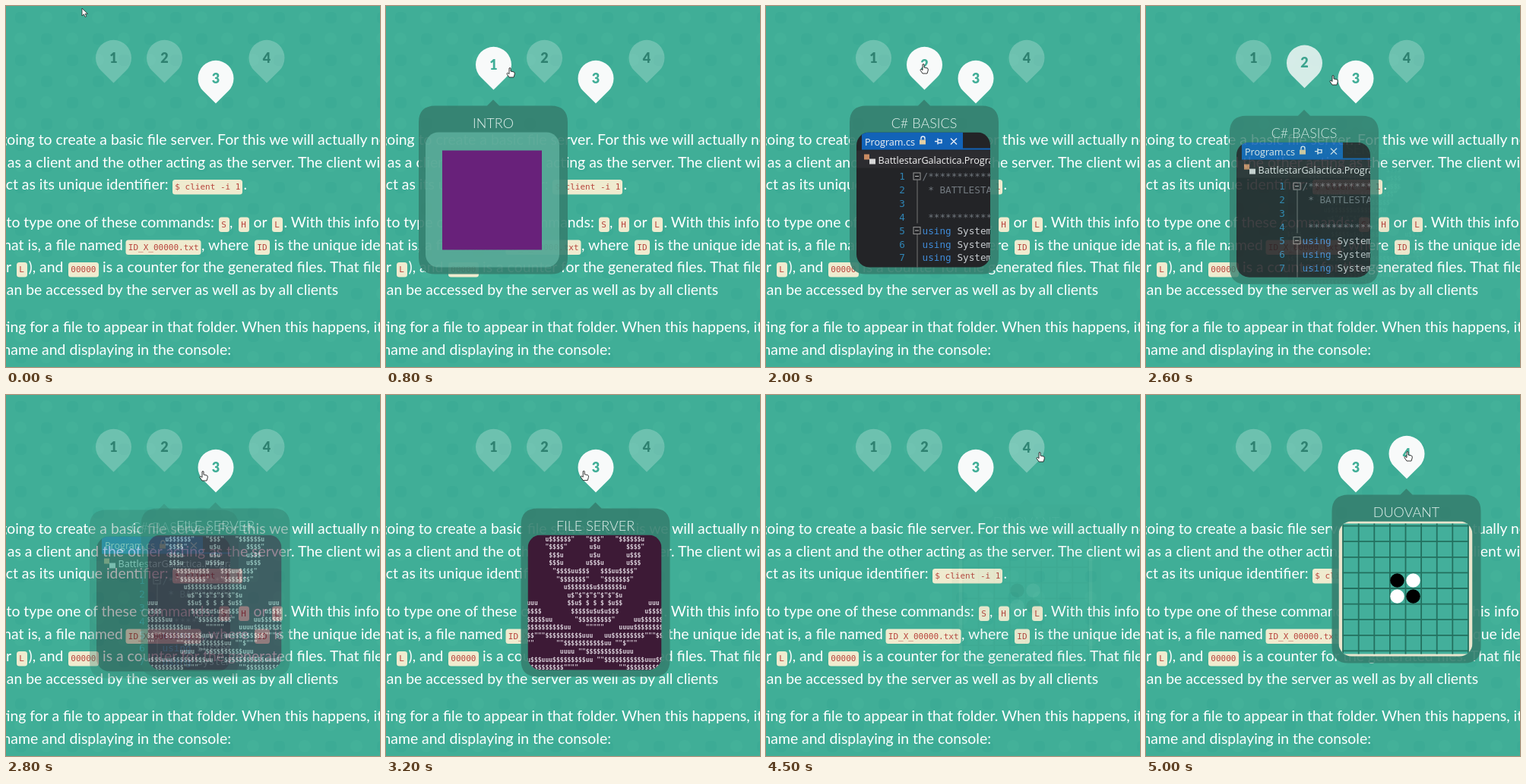
Animation of 492x476 px, one loop 5100 ms. Source, as an HTML page:

```html
<!DOCTYPE html>
<html lang="en">
<head>
<meta charset="utf-8">
<title>Lesson steps</title>
<style>
html, body { margin: 0; width: 100%; height: 100%; overflow: hidden; background: #40ae97; }
svg { display: block; width: 492px; height: 476px; }
text { white-space: pre; }
.body { font: 19.4px Lato, sans-serif; fill: #fff; }
.chip { font: 11px "DejaVu Sans Mono", monospace; fill: #b8443c; }
.num { font: 900 18px Lato, sans-serif; text-anchor: middle; }
.title { font: 300 18px Lato, sans-serif; text-anchor: middle; fill: #e3f1ed; }
.ui { font: 12.6px "Open Sans", sans-serif; fill: #f2f2f2; }
.code { font: 12.7px "DejaVu Sans Mono", monospace; fill: #737a80; }
.skull { font: bold 8.05px "DejaVu Sans Mono", monospace; fill: #d6ccd6; }
</style>
</head>
<body>
<svg viewBox="0 0 492 476">
  <defs>
    <pattern id="spots" width="68" height="56" patternUnits="userSpaceOnUse">
      <g fill="#1d8f7c" opacity=".1">
        <rect x="12" y="8" width="15" height="15" rx="5"/>
        <rect x="46" y="36" width="15" height="15" rx="5"/>
      </g>
      <g fill="#6fd0b4" opacity=".07">
        <circle cx="53" cy="15" r="8"/>
        <circle cx="19" cy="43" r="8"/>
      </g>
    </pattern>
    <clipPath id="thumb"><rect x="-89" y="166" width="176" height="178" rx="17"/></clipPath>
  </defs>
  <rect width="492" height="476" fill="#40ae97"/>
  <rect width="492" height="476" fill="url(#spots)"/>
  <g id="page"></g>
  <g id="tips"></g>
  <g id="pins"></g>
  <g id="cursor">
    <path id="arrow" d="M0 0V10L2.4 7.8L4 11.4L5.8 10.6L4.2 7.2H7.4Z" fill="#fff" stroke="#222" stroke-width=".8"/>
    <path id="hand" d="M-1 0Q0-1 1 0V4L5.4 5Q6.6 5.6 6.2 8L5 12H-1L-4 7.6Q-4 6-2.6 6.4L-1 7.6Z" fill="#fff" stroke="#222" stroke-width=".9"/>
    <path id="beam" d="M-2.5-4H2.5M0-4V4M-2.5 4H2.5" fill="none" stroke="#4b6f66" stroke-width=".7"/>
  </g>
</svg>
<script>
const $ = id => document.getElementById(id);
const esc = s => s.replace(/&/g, '&amp;').replace(/</g, '&lt;');
const text = (x, y, cls, s, more = '') => `<text x="${x}" y="${y}" class="${cls}" ${more}>${esc(s)}</text>`;
const rect = (x, y, w, h, fill, more = '') =>
  `<rect x="${x}" y="${y}" width="${w}" height="${h}" fill="${fill}" ${more}/>`;
const range = n => [...Array(n).keys()];

// Each line: baseline, then [x, text] runs; a third item makes a chip of that width.
const lines = [
  [183, [-8.8, 'going to create a basic file server. For this we will actually need']],
  [212.5, [1.8, 'as a client and the other acting as the server. The client will']],
  [242, [-10, 'act as its unique identifier:'], [219, '$ client -i 1', 92], [312.5, '.']],
  [291.5, [0.5, 'to type one of these commands:'], [280, 'S', 14], [294, ','], [306, 'H', 14],
    [325.5, 'or'], [350, 'L', 14], [365.5, '. With this information']],
  [321.5, [-15, 'That is, a file named'], [157.5, 'ID_X_00000.txt', 99], [257, ', where'],
    [327, 'ID', 20], [352.5, 'is the unique identifier']],
  [351, [-11, 'or'], [14, 'L', 14], [29.5, '), and'], [82, '00000', 40],
    [127, 'is a counter for the generated files. That file']],
  [380.5, [-8.5, 'can be accessed by the server as well as by all clients']],
  [430, [-6.5, 'ting for a file to appear in that folder. When this happens, it']],
  [459.5, [-4.5, 'name and displaying in the console:']]
];
$('page').innerHTML = lines.map(([y, ...runs]) => runs.map(([x, s, w]) => w
  ? rect(x, y - 13, w, 19.5, '#efebcf', 'rx="3.5"') + text(x + 3.3, y, 'chip', s)
  : text(x, y, 'body', s)).join('')).join('');

const block = rect(-67, 190, 131, 131, '#68217a');

const editor = () => {
  let s = rect(-89, 166, 176, 180, '#232427') + rect(-89, 190, 176, 23, '#2c2c30') +
    rect(-82, 166, 133, 22, '#1263b8') + rect(-82, 187, 170, 2, '#1263b8') +
    text(-78, 183, 'ui', 'Program.cs') + text(-60.5, 207, 'ui', 'BattlestarGalactica.Program') +
    '<path d="M-4 176V174A2 2 0 0 1 1 174V176M14 178H18M18 174V182M18 176H23V180H18M35 174L43 182M43 174L35 182" fill="none" stroke="#e8eef6" stroke-width="1.4"/>' +
    rect(-6, 176, 8, 6, '#e3cfa4') + rect(-79, 195, 7, 7, '#c98b62') + rect(-72, 201, 8, 7, '#d8d8d8') +
    '<path d="M-9 229V286M-9 300V346" stroke="#777" fill="none"/>';
  const code = ['/**************', ' * BATTLESTAR', '', ' **************', '', '', ''];
  code.forEach((c, i) => {
    const y = 228.5 + 17.9 * i;
    s += text(-25, y, 'code', String(i + 1), 'text-anchor="end" style="fill:#2f84b4"') + text(-2.5, y, 'code', c);
    if (i > 3) s += text(-2.5, y, 'code', 'using', 'style="fill:#3f8ad6"') +
      text(43.4, y, 'code', 'System', 'style="fill:#c8ccd0"');
    if (i % 4 == 0) s += rect(-14, y - 9, 9, 9, '#232427', 'stroke="#999"') +
      `<path d="M-12 ${y - 4.5}H-7" stroke="#bbb"/>`;
  });
  return s;
};

const art = String.raw`
       u$$$$$$"   "$$$"   "$$$$$$u
       "$$$$"      u$u       $$$$"
        $$$u       u$u       u$$$
        $$$u      u$$$u      u$$$
         "$$$$uu$$$   $$$uu$$$$"
          "$$$$$$$"   "$$$$$$$"
            u$$$$$$$u$$$$$$$u
             u$"$"$"$"$"$"$u
  uuu        $$u$ $ $ $ $u$$       uuu
 u$$$$        $$$$$u$u$u$$$       u$$$$
  $$$$$uu      "$$$$$$$$$"     uu$$$$$$
u$$$$$$$$$$$uu    """""    uuuu$$$$$$$$$$
$$$$"""$$$$$$$$$$uuu   uu$$$$$$$$$"""$$$"
 """      ""$$$$$$$$$$$uu ""$"""
           uuuu ""$$$$$$$$$$uuu
  u$$$uuu$$$$$$$$$uu ""$$$$$$$$$$$uuu$$$
  $$$$$$$$$$""""           ""$$$$$$$$$$$"`.slice(1).split('\n');
const terminal = rect(-89, 166, 176, 180, '#3d1a36') +
  art.map((r, i) => text(-100, 174 + 10.6 * i, 'skull', r)).join('');

const board = rect(-89, 166, 176, 180, '#e9e5cd') + rect(-84, 169, 166, 172, '#43af9b') +
  range(9).map(i => `<path d="M${-83.4 + 20.6 * i} 169V341M-84 ${172.1 + 20.6 * i}H82" stroke="#23705f" stroke-width="1.8"/>`).join('') +
  range(4).map(i => `<circle cx="${i % 2 ? 9 : -12}" cy="${i < 2 ? 244 : 265}" r="9.3" fill="${i % 3 ? '#fff' : '#000'}"/>`).join('');

// rest and up: pin offsets; show and hide: times in ms
const steps = [
  { x: 141.5, rest: 0, up: 9, tipY: 0, show: 200, hide: 1240, title: 'INTRO', pic: block },
  { x: 208.5, rest: 0, up: 9, tipY: 0, show: 1560, hide: 2550, title: 'C# BASICS', pic: editor() },
  { x: 276, rest: 27, up: 27, tipY: 18, show: 2590, hide: 3930, title: 'FILE SERVER', pic: terminal },
  { x: 343, rest: 0, up: 9, tipY: 0, show: 4480, hide: 9e3, title: 'DUOVANT', pic: board }
];
$('tips').innerHTML = steps.map(s => `<g>
  <path d="M-76 131H-8L0 123L8 131H76Q98 131 98 153V331Q98 353 76 353H-76Q-98 353-98 331V153Q-98 131-76 131Z" fill="#35806f" fill-opacity=".91"/>
  ${s.pic == block ? rect(-89, 166, 176, 178, '#72c6b2', 'rx="17" opacity=".55"') : ''}
  ${text(0, 160.5, 'title', s.title)}<g clip-path="url(#thumb)">${s.pic}</g></g>`).join('');
$('pins').innerHTML = steps.map((s, i) => `<g>
  <path d="M-16.6 16.6A23.5 23.5 0 1 1 16.6 16.6L0 33.2Z" fill="#f8fafa"/>
  ${text(0, 6.3, 'num', String(i + 1))}</g>`).join('');

// time, x, y of the pointer
const track = [[0, 100, 3], [100, 104, 10], [300, 150, 68], [600, 163, 82], [1150, 163, 82], [1300, 172, 80],
  [1600, 190, 77], [1900, 207, 77], [2450, 207, 77], [2600, 246, 92], [2800, 259, 101], [3800, 262, 100],
  [3900, 296, 95], [4000, 309, 95], [4200, 480, 90], [4350, 440, 80], [4500, 360, 76], [4700, 344, 75], [5100, 344, 75]];

const clamp = v => Math.max(0, Math.min(1, v));
const mix = (a, b, k) => a + (b - a) * k;
const out = k => 1 - (1 - k) ** 8;
const rgb = (a, b, k) => `rgb(${a.map((v, i) => mix(v, b[i], k))})`;

function draw(t) {
  steps.forEach((s, i) => {
    const leaving = t >= s.hide;
    const phase = ms => clamp((t - (leaving ? s.hide : s.show)) / ms);
    const seen = leaving ? 1 - phase(400) : phase(400);
    const drop = 20 * (leaving ? out(phase(400)) : 1 - out(phase(400)));
    const tip = $('tips').children[i];
    tip.setAttribute('transform', `translate(${s.x - .5} ${s.tipY + drop + .5})`);
    tip.setAttribute('opacity', seen);

    const lift = leaving ? 1 - phase(200) : phase(200);
    const lit = s.rest ? 1 : lift;
    const pin = $('pins').children[i];
    pin.setAttribute('transform', `translate(${s.x} ${mix(s.rest, s.up, lift) + 68.4})`);
    pin.children[0].setAttribute('fill-opacity', mix(.24, 1, lit));
    pin.children[1].setAttribute('fill', rgb([47, 130, 113], [64, 174, 151], lit));
  });

  const n = track.findIndex(p => p[0] > t);
  const [a, b] = [track[n - 1], track[n]];
  const k = (t - a[0]) / (b[0] - a[0]);
  $('cursor').setAttribute('transform', `translate(${mix(a[1], b[1], k)} ${mix(a[2], b[2], k)})`);
  const kind = t >= 3900 && t < 4150 ? 'beam' : steps.some(s => t >= s.show && t < s.hide) || (t > 1200 && t < 3900) ? 'hand' : 'arrow';
  for (const id of ['arrow', 'hand', 'beam']) $(id).style.display = id == kind ? '' : 'none';
}

const start = performance.now();
function tick() {
  // the picture advances in steps of 100 ms
  draw(Math.floor((performance.now() - start) % 5100 / 100) * 100);
  requestAnimationFrame(tick);
}
tick();
</script>
</body>
</html>
```
